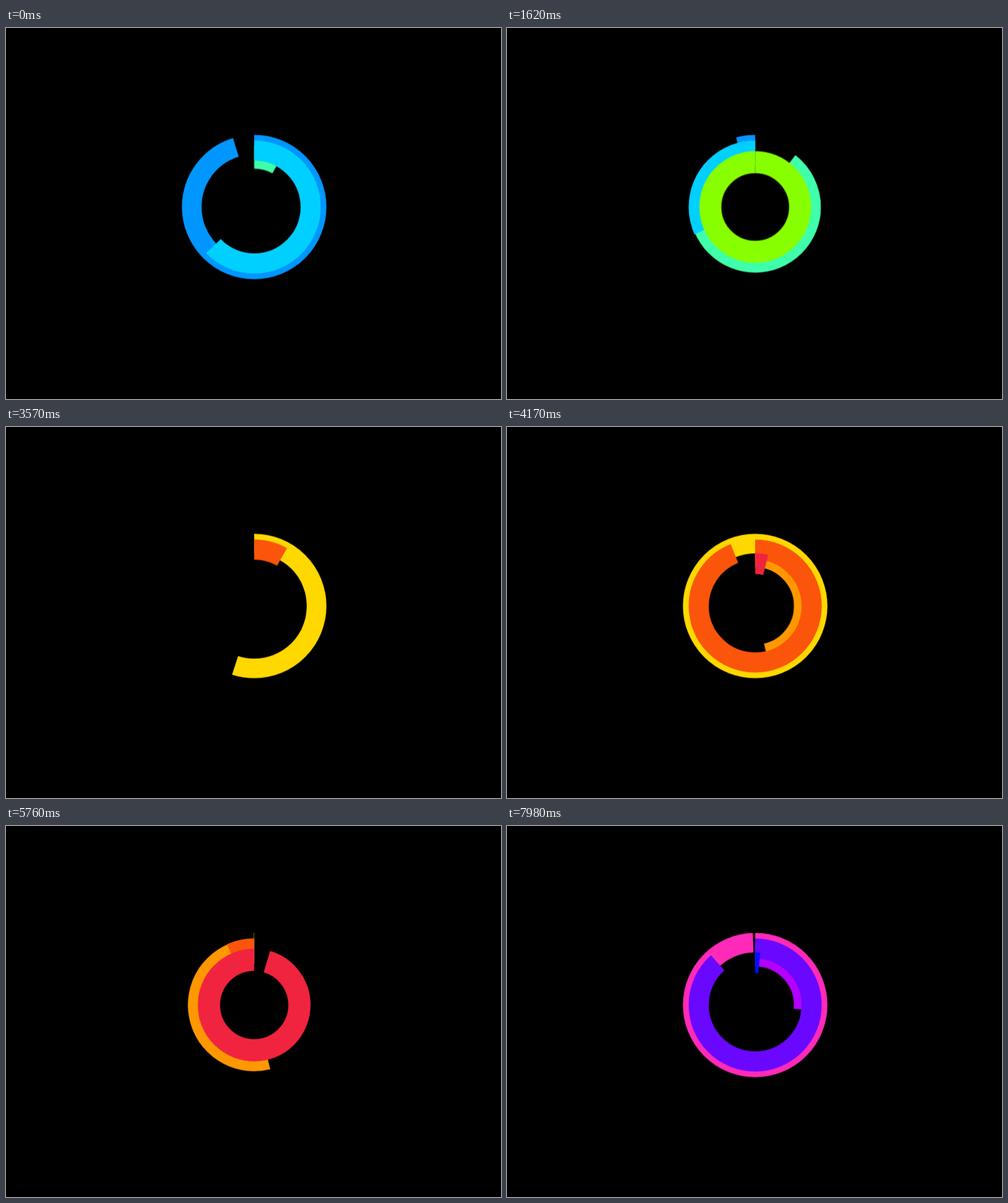
Animation of 800x600 px, one loop 8000 ms. Source, as an HTML page without scripts:

```html
<!DOCTYPE html>
<html lang="en">
<head>
<meta charset="utf-8">
<title>Rings</title>
<style>
  html, body { margin: 0; width: 100%; height: 100%; overflow: hidden; background: #000; }
  svg { display: block; width: 100vw; height: 100vh; }

  circle {
    fill: none;
    stroke-dasharray: 0 200;
    animation: sweep 8s calc(var(--start) + var(--lag)) infinite both;
  }

  /* Ring sizes and their place in the cascade */
  .a { --lag: 0ms;   r: 100.9px; stroke-width: 31.6px; }
  .b { --lag: 298ms; r: 91.3px;  stroke-width: 32.6px; }
  .c { --lag: 633ms; r: 89.15px; stroke-width: 41.5px; }
  .d { --lag: 987ms; r: 76.1px;  stroke-width: 37.4px; }
  .c, .d { animation-name: sweep, swell; animation-timing-function: linear; }

  /* Each set follows the previous one by 3.9 s */
  .cool  { --start: -981ms; animation: early 8s step-end infinite; }
  .warm  { --start: 2919ms; }
  .vivid { --start: 6819ms; animation: late 8s step-end infinite; }

  /* Draw clockwise, rest, then erase clockwise */
  @keyframes sweep {
    0% {
      stroke-dasharray: 0 200; stroke-dashoffset: 0;
      animation-timing-function: cubic-bezier(.7, 0, .3, 1);
    }
    15.825% { stroke-dasharray: 100 200; stroke-dashoffset: 0; }
    19.54% {
      stroke-dasharray: 100 200; stroke-dashoffset: 0;
      animation-timing-function: cubic-bezier(.7, 0, .3, 1);
    }
    36.075%, 100% { stroke-dasharray: 100 200; stroke-dashoffset: -100; }
  }
  @keyframes swell {
    0% { transform: scale(.892); }
    36.075%, 100% { transform: scale(1); }
  }
  @keyframes early { 0% { opacity: 1; } 36.3%, 100% { opacity: 0; } }
  @keyframes late  { 0% { opacity: 0; } 85.2%, 100% { opacity: 1; } }
</style>
</head>
<body>
<svg viewBox="0 0 800 600">
  <g transform="translate(401.1 289.5) rotate(-90)">
    <g class="cool">
      <circle class="a" pathLength="100" stroke="#0096ff"/>
      <circle class="c" pathLength="100" stroke="#40ffaa"/>
      <circle class="b" pathLength="100" stroke="#00d0ff"/>
      <circle class="d" pathLength="100" stroke="#88ff00"/>
    </g>
    <g class="warm">
      <circle class="a" pathLength="100" stroke="#ffd800"/>
      <circle class="c" pathLength="100" stroke="#ff9800"/>
      <circle class="b" pathLength="100" stroke="#fa550a"/>
      <circle class="d" pathLength="100" stroke="#f0243f"/>
    </g>
    <g class="vivid">
      <circle class="a" pathLength="100" stroke="#ff2ab8"/>
      <circle class="c" pathLength="100" stroke="#b400ff"/>
      <circle class="b" pathLength="100" stroke="#6a08ff"/>
      <circle class="d" pathLength="100" stroke="#0010ff"/>
    </g>
  </g>
</svg>
</body>
</html>
```
